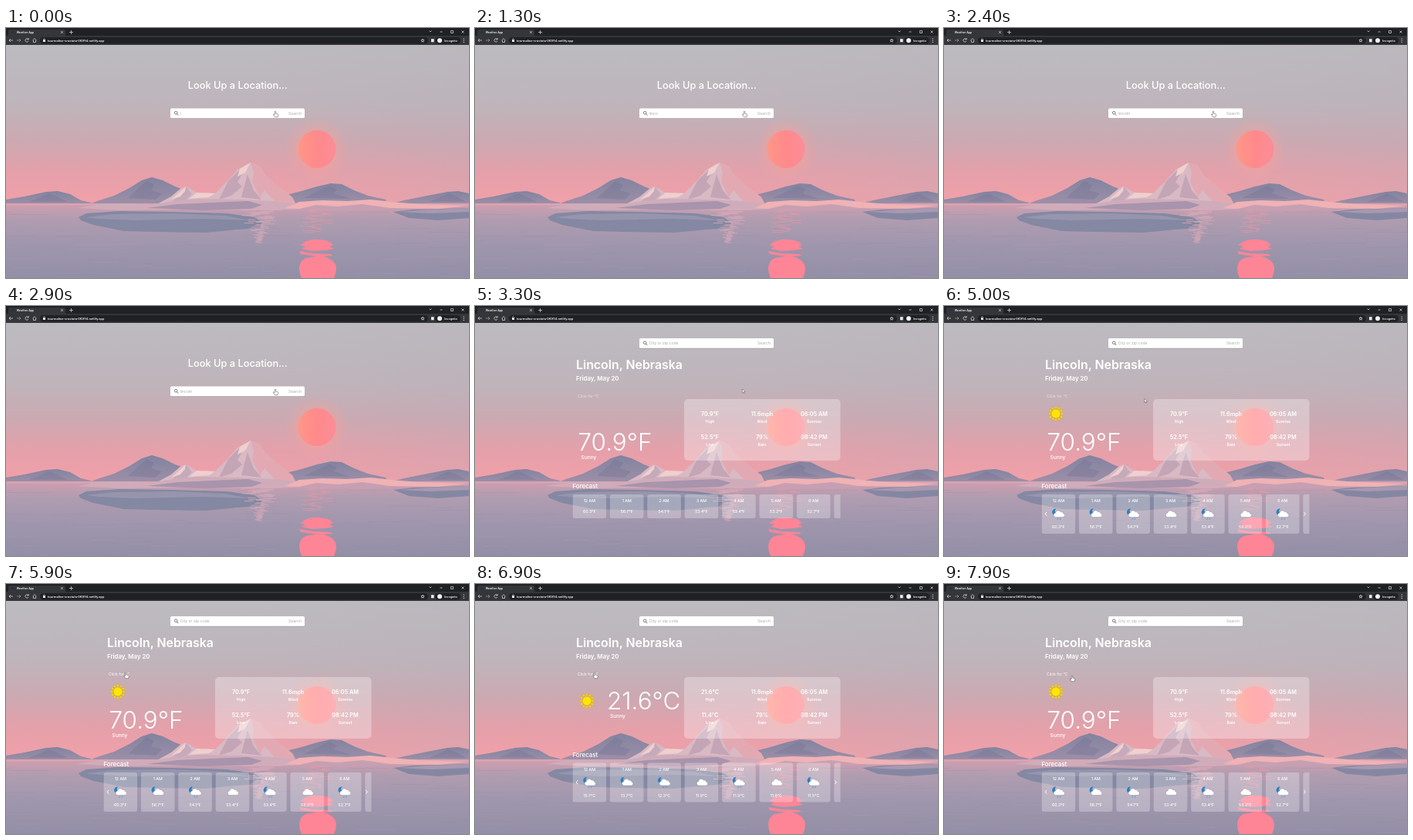
An HTML page that plays this animation: 600 px wide and 325 px high, repeating every 8000 ms.

```html
<!DOCTYPE html>
<html lang="en">
<head>
<meta charset="utf-8">
<title>Weather App</title>
<style>
  html, body { margin: 0; width: 100%; height: 100%; overflow: hidden; background: #bcbbc0; }
  svg { display: block; width: 600px; height: 325px; font-family: Inter, "Open Sans", sans-serif; }
  .ui { font-family: Roboto, Arial, sans-serif; font-weight: 500; fill: #f1f3f4; }
  .page text { fill: #fff; }
  .page .field { fill: #a9a9ad; }
  .mid { text-anchor: middle; }
  .semi { font-weight: 600; }
  .medium { font-weight: 500; }
  .line { fill: none; stroke: #dfe1e5; stroke-width: .7; }
</style>
</head>
<body>
<svg viewBox="0 0 600 325">
  <defs>
    <linearGradient id="sky" x2="0" y2="1">
      <stop offset="0" stop-color="#bcbbc0"/>
      <stop offset=".36" stop-color="#beb5bb"/>
      <stop offset=".6" stop-color="#cca9b2"/>
      <stop offset=".8" stop-color="#e5a0aa"/>
      <stop offset="1" stop-color="#f2a0a8"/>
    </linearGradient>
    <linearGradient id="haze">
      <stop offset=".55" stop-color="#b8adb8" stop-opacity="0"/>
      <stop offset="1" stop-color="#b8adb8" stop-opacity=".25"/>
    </linearGradient>
    <linearGradient id="water" x2="0" y2="1">
      <stop offset="0" stop-color="#cd9eaf"/>
      <stop offset=".2" stop-color="#b09cb0"/>
      <stop offset=".55" stop-color="#9f96ad"/>
      <stop offset="1" stop-color="#938fa6"/>
    </linearGradient>
    <linearGradient id="disc">
      <stop offset="0" stop-color="#ff9787"/>
      <stop offset=".5" stop-color="#ff898b"/>
      <stop offset="1" stop-color="#fb8d98"/>
    </linearGradient>
    <radialGradient id="glow">
      <stop offset=".5" stop-color="#ffa193" stop-opacity=".45"/>
      <stop offset="1" stop-color="#f6a0a0" stop-opacity="0"/>
    </radialGradient>
    <linearGradient id="ridge" x2="0" y2="1">
      <stop offset="0" stop-color="#8283a0"/>
      <stop offset="1" stop-color="#9d8fa8"/>
    </linearGradient>
    <clipPath id="strip"><rect x="126.5" y="244" width="347" height="53"/></clipPath>
    <g id="cloud" stroke="#777" stroke-width=".35">
      <path fill="#fff" d="M-5 4a2.8 2.8 0 0 1 .2-5.500a3.600 3.600 0 0 1 6.700-1.200a2.500 2.500 0 0 1 3.400 2a2.400 2.400 0 0 1-.2 4.700z"/>
    </g>
    <path id="moon" fill="#2a7fc0" d="M-4-7a4.300 4.300 0 1 0 2.500 7a3.900 3.900 0 0 1-2.500-7z"/>
    <path id="drops" stroke="#3d9be0" stroke-width="1" d="M-1.500 5.200l-.8 2M1.800 5.200l-.8 2"/>
  </defs>

  <!-- Landscape -->
  <rect y="22" width="600" height="208" fill="url(#sky)"/>
  <rect y="22" width="600" height="208" fill="url(#haze)"/>
  <circle cx="403" cy="158" r="42" fill="url(#glow)"/>
  <circle cx="403" cy="157.500" r="24.500" fill="url(#disc)"/>
  <g fill="url(#ridge)">
    <path d="M0 223l24-4 28-6 15-1 16 4 14 8 13 3v2H0z"/>
    <path d="M108 229l10-4 22-7 20-10 16-10 13-4 14 4 16 8 16 6 25 7v10z"/>
    <path d="M363 217l20-5 20-6 18-4 14 1 16 8 18 7 23 5 2 5H363z"/>
    <path d="M500 228l16-4 30-6 26-5 14-1 14 3v14H500z"/>
  </g>
  <path fill="#70718f" opacity=".35" d="M158 221l24-22 10 5-4 7 14 4-8 8zM386 221l33-16 10 5-4 5 22 7zM548 226l26-11 12 5 10 6zM30 226l26-11 12 5 12 6z"/>
  <rect y="230" width="600" height="95" fill="url(#water)"/>
  <rect y="228" width="600" height="2.500" fill="#dca3b0"/>
  <g id="ripples" stroke-width=".7"></g>

  <!-- Ice -->
  <path fill="#d8b9c4" d="M194 230l20-11 13-11 6-2 14 8 24 1 16-16 13-15 17-9 12 5 7 11 18 16 17 13 5 10H194z"/>
  <path fill="#e3a9b2" d="M317 175l12 5 7 11 18 16 17 13 5 10-26-3-15-16-6 9-10-20 2-12z"/>
  <path fill="#c3a5b6" d="M288 199l14-14 5 3-7 12 6 6-14 12-16 5zM313 190l8 21 10 12-26-3z"/>
  <path fill="#b79fb2" d="M233 206l8 10-8 8-18 2 8-8z" opacity=".55"/>
  <path fill="#f0cfcf" d="M317 175l-14 8-3 10 10-5zM233 206l-12 11-7 6 12-4 6-7zM247 214l24 1-8 5-26 2z"/>
  <path fill="#d0acba" d="M92 234l30-5 36-1 30 2 28-5 32-3 52 1 46 2 44 5 16 4-60 3-120-1-80 1z"/>
  <path fill="#a894ac" d="M182 234l40-5 66-3 26-1 18 5-14 5-60 2z"/>
  <path fill="#f0b2b5" d="M362 234l18-8 30-2 32 1 30-2 28 3 34 3 66 2-40 4-60-1-60 3-44-1z"/>
  <path fill="#c6a0b2" d="M376 236l26-6 28 2 32-3 36 5-24 3-60 1z"/>
  <path fill="#8488a2" d="M94 246l10-5 42-3 70 1 70 2 36 5 10 7-3 7-30 2-40 4-66-1-40-1-40-8-16-6z"/>
  <path fill="#9795ad" d="M104 246l34-4 78-1 68 3 32 6-60-2-90 2-46-2z"/>
  <path fill="#8587a2" d="M502 239l26-3 72-2v13l-40 3-38-3z"/>
  <path fill="#a898b0" d="M510 239l38-3 52-2v5l-50 2z"/>
  <g id="glints"></g>
  <g fill="#fd8596">
    <path d="M386 279q8-5 20-4 14 1 18 7l-5 2 6 3-12 2-16 1-14-3 5-3-7-2z"/>
    <path d="M380 290l18 3 22 1 4 2-20 1-22-3z"/>
    <path d="M380 312q1-13 14-14l14-2q19 4 20 16 0 7-3 13h-42q-3-6-3-13z"/>
  </g>

  <!-- Browser -->
  <g class="ui">
    <rect width="600" height="10.500" fill="#202124"/>
    <rect y="10" width="600" height="12" fill="#35363a"/>
    <path fill="#35363a" d="M1 10.500q2 0 2-3V4q0-2 2-2h70q2 0 2 2v3.500q0 3 2 3z"/>
    <circle cx="9" cy="5.500" r="1.700" fill="#23324d"/>
    <text x="13.700" y="7" font-size="3.900">Weather App</text>
    <rect x="44" y="12" width="503" height="8.500" rx="4.200" fill="#202124"/>
    <text x="54" y="17.700" font-size="4.300">tourmaline-crostata-0f0f94.netlify.app</text>
    <rect x="556" y="12" width="33" height="8.500" rx="4.200" fill="#202124"/>
    <circle cx="562" cy="16.200" r="3" fill="#f1f3f4"/>
    <text x="568" y="17.600" font-size="4">Incognito</text>
    <path class="line" d="M71 4l3 3m0-3l-3 3M82 5.500h5M84.500 3v5M548.500 3.500l1.500 1.500 1.500-1.500M562.500 5h3M576.500 3.500h3v3h-3zM590.500 3.500l3 3m0-3l-3 3M9 16H4m2-2l-2 2 2 2M28.800 14.500a2.200 2.200 0 1 0 .3 2.500M29.200 13v2h-2M34.500 16l2.500-2.300 2.500 2.300M35.500 16v2.500h3V16M48.500 15.500v-1q1-2 2 0v1"/>
    <path class="line" opacity=".6" d="M14 16h5m-2-2l2 2-2 2"/>
    <path d="M48 15.300h3v2.700h-3zM551 14.200h3.600v4H551z"/>
    <path class="line" stroke-width=".5" d="M540 14l.6 1.500 1.500.1-1.200 1 .4 1.600-1.300-.9-1.300.9.400-1.600-1.200-1 1.500-.1z"/>
    <path d="M592.700 13.500h1v1h-1zm0 2.200h1v1h-1zm0 2.200h1v1h-1z"/>
  </g>

  <g class="page">
    <text id="title" class="mid medium" x="300.300" y="79.200" font-size="12.800">Look Up a Location...</text>
    <g id="search">
      <rect x="213" y="105" width="174" height="13" rx="1.500" fill="#54475a" opacity=".25"/>
      <rect x="213" y="104.500" width="174" height="12.700" rx="1.500" fill="#fff"/>
      <circle cx="220.200" cy="110.200" r="1.800" fill="none" stroke="#444" stroke-width=".7"/>
      <path d="M221.500 111.600l1.800 2" stroke="#444" stroke-width=".8"/>
      <text id="query" class="field" x="225.500" y="112.800" font-size="5.100"></text>
      <text class="field" x="366" y="112.800" font-size="5.100">Search</text>
    </g>

    <g id="weather">
      <text class="semi" x="131" y="82.300" font-size="15.900">Lincoln, Nebraska</text>
      <text class="semi" x="131" y="97" font-size="7.800">Friday, May 20</text>
      <text id="toggle" x="133" y="118.700" font-size="5.100"></text>
      <g id="sun"></g>
      <g id="now">
        <text id="temp" x="133.500" y="187.500" font-size="31.400" font-weight="300"></text>
        <text class="medium" x="137.500" y="198.600" font-size="6.600">Sunny</text>
      </g>
      <rect x="271" y="121" width="202.500" height="80" rx="5" fill="#fff" opacity=".3"/>
      <g id="stats"></g>
      <g id="forecast">
        <text class="medium" x="126.500" y="237" font-size="7.900">Forecast</text>
        <g id="cards" clip-path="url(#strip)"></g>
        <path id="arrows" fill="none" stroke="#fff" d="M133 268l-1.800 2.300 1.800 2.300M466.500 268l1.800 2.300-1.800 2.300"/>
      </g>
    </g>
  </g>

  <g id="cursor" stroke="#444" stroke-width=".5" stroke-linejoin="round">
    <path id="hand" fill="#fff" d="M-.8-3q.8-1 1.500 0v2.600l2.400.6q.8.300.6 1.500l-.7 2.500H-.5L-2.600 1.200q-.2-1 .8-.7l1 .8z"/>
    <path id="arrow" fill="#fff" d="M-1.200-2.600v5l1.200-1 .8 1.700.9-.4-.7-1.600h1.500z"/>
  </g>
</svg>

<script>
const LOOP = 8000;
const $ = id => document.getElementById(id);
const show = (id, on) => { $(id).style.display = on ? "" : "none"; };
const shift = (id, x, y) => $(id).setAttribute("transform", `translate(${x} ${y})`);
const label = (x, y, size, text, cls, data = "") =>
  `<text class="mid ${cls}" x="${x}" y="${y}" font-size="${size}"${data}>${text}</text>`;

let seed = 11;
const rand = (a, b) => {
  seed = (seed * 16807) % 2147483647;
  return a + (b - a) * seed / 2147483647;
};

const dash = (x, y, w, color, alpha) =>
  `<path d="M${x - w / 2} ${y}h${w}" stroke="${color}" opacity="${alpha}"/>`;

function buildWater() {
  let ripples = "", glints = "";
  for (let i = 0; i < 60; i++) {
    ripples += dash(rand(0, 600), rand(238, 324), rand(12, 65), i % 2 ? "#b9a5b6" : "#8a86a0", .25);
  }
  for (let i = 0; i < 40; i++) {
    const y = 236 + i * 1.1;
    const reach = (284 - y) * .45;
    glints += dash(328 + rand(-reach, reach), y, rand(.3, 1.2) * reach + 4, "#dcabb8", .75);
    if (i < 28) glints += dash(403 + rand(-14, 14), y, rand(4, 18), "#f797a2", .5);
  }
  $("ripples").innerHTML = ripples;
  $("glints").innerHTML = glints;
}

function buildSun() {
  let rays = "";
  for (let a = 0; a < 360; a += 30) {
    rays += `<path d="M-1.500-6.800h3L0-10.600z" transform="rotate(${a})"/>`;
  }
  $("sun").innerHTML = `<g fill="#ffe600" stroke="#d9a900" stroke-width=".4">${rays}<circle r="5.800"/></g>`;
}

function buildStats() {
  const rows = [
    [["70.9", "High"], ["11.6mph", "Wind"], ["06:05 AM", "Sunrise"]],
    [["52.5", "Low"], ["79%", "Rain"], ["08:42 PM", "Sunset"]]
  ];
  $("stats").innerHTML = rows.map((row, r) => row.map(([value, name], c) => {
    const x = [304.5, 372, 439.5][c], y = 142.7 + r * 30;
    const data = c ? "" : ` data-f="${value}"`;
    return label(x, y, 7.3, value, "semi", data) + label(x, y + 9.5, 5.2, name, "semi");
  }).join("")).join("");
}

function buildCards() {
  const temps = [60.3, 56.7, 54.1, 53.4, 53.4, 53.2, 52.7, 52.5];
  const skies = ["md", "m", "md", "", "md", "", "md", ""];
  $("cards").innerHTML = temps.map((f, i) => {
    const x = 148.3 + i * 48.4;
    const moon = skies[i].includes("m") ? '<use href="#moon"/>' : "";
    const drops = skies[i].includes("d") ? '<use href="#drops"/>' : "";
    return `<rect class="card" x="${x - 21.8}" y="245" width="43.600" rx="3" fill="#fff" opacity=".27"/>` +
      (i < 7 ? label(x, 255.2, 5.2, (i || 12) + " AM", "medium") +
        `<g class="icon" transform="translate(${x + 1} 270.500)">${moon}<use href="#cloud"/>${drops}</g>` +
        label(x, 289, 5.2, "", "medium low", ` data-f="${f}"`) : "");
  }).join("");
}

buildWater();
buildSun();
buildStats();
buildCards();
const degrees = document.querySelectorAll("[data-f]");
const cards = document.querySelectorAll(".card");
const icons = document.querySelectorAll(".icon");
const lows = document.querySelectorAll(".low");

const KEYS = [0, 300, 600, 1000, 1300, 1500, 1800];

const format = (f, celsius) => celsius ? ((f - 32) / 1.8).toFixed(1) + "°C" : Number(f).toFixed(1) + "°F";

function pointer(t) {
  if (t < 3300) return [349, 111.5];
  if (t >= 7900) return [166, 122.5];
  const p = Math.min(1, Math.max(0, (t - 4300) / 1500));
  const e = p * p * (3 - 2 * p);
  return [347.5 - 192 * e, 110.5 + 8 * e + 9 * Math.sin(Math.PI * e)];
}

function render(t) {
  const found = t >= 3300;
  const loaded = t >= 3400;
  const celsius = t >= 6300 && t < 7600;

  show("title", !found);
  show("weather", found);
  shift("search", 0, found ? -62.5 : 0);
  $("query").textContent = found ? "City or zip code" : "lincoln".slice(0, KEYS.filter(k => k <= t).length);

  const [x, y] = pointer(t);
  const hover = x < 168;
  shift("cursor", x, y);
  show("hand", !found || hover);
  show("arrow", found && !hover);
  if (!found) return;

  $("toggle").textContent = "Click for " + (celsius ? "°F" : "°C");
  $("toggle").style.opacity = hover ? 1 : .6;
  $("temp").textContent = format(70.9, celsius);
  degrees.forEach(el => { el.textContent = format(el.dataset.f, celsius); });
  shift("now", celsius ? 37.5 : 0, celsius ? -25 : 0);
  shift("sun", 145, celsius ? 152 : 140);
  shift("forecast", 0, celsius ? -12.5 : 0);
  show("sun", loaded);
  show("arrows", loaded);
  icons.forEach(el => { el.style.display = loaded ? "" : "none"; });
  cards.forEach(el => el.setAttribute("height", loaded ? 51 : 31));
  lows.forEach(el => el.setAttribute("y", loaded ? 289 : 269));
}

const start = performance.now();
function tick() {
  render((performance.now() - start) % LOOP);
  requestAnimationFrame(tick);
}
tick();
</script>
</body>
</html>
```
